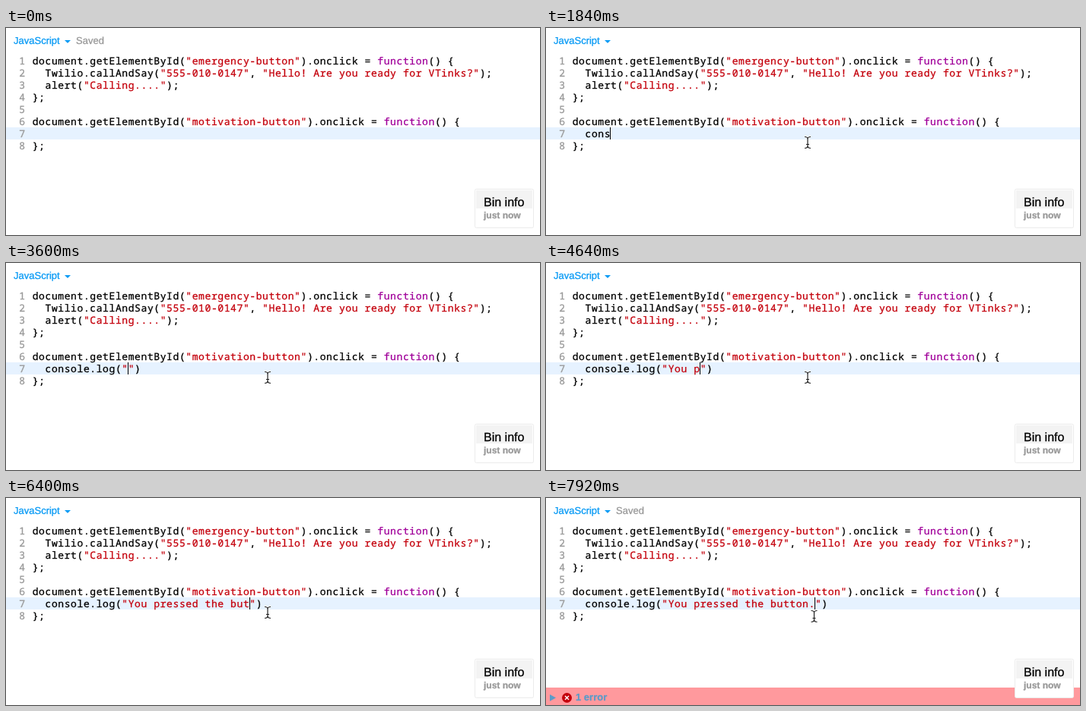
Write an HTML page with a canvas that moves like this. It is 702x273 px and loops after 8000 ms.

```html
<!DOCTYPE html>
<html lang="en">
<head>
<meta charset="utf-8">
<title>Code editor typing</title>
<style>
  html, body { margin: 0; width: 100%; height: 100%; overflow: hidden; background: #fff; }
  canvas { display: block; }
</style>
</head>
<body>
<canvas id="stage" width="702" height="273"></canvas>
<script>
const ctx = document.getElementById('stage').getContext('2d');
const W = 702, H = 273;
const LOOP = 8000, TICK = 80;
const CELL = 8.4, LINE = 16, CODE_X = 34.4, CODE_Y = 35;
const MONO = '13px "Noto Sans Mono", monospace';
const SANS = '"Liberation Sans", Arial, sans-serif';

const before = [
  'document.getElementById("emergency-button").onclick = function() {',
  '  Twilio.callAndSay("555-010-0147", "Hello! Are you ready for VTinks?");',
  '  alert("Calling....");',
  '};',
  '',
  'document.getElementById("motivation-button").onclick = function() {'
];
const after = ['};'];

// One tick per key press
const keys = 'console.log("You pressed the button.';
const pressed = [
  17, 19, 21, 23, 24, 26, 28, 32, 34, 36, 38, 42, 45,
  49, 51, 53, 55, 58, 60, 61, 64, 65, 67, 68, 70, 72, 73, 74, 76,
  78, 79, 80, 82, 83, 84, 99
];
const FADE_FROM = 2, FADE_TO = 11, CARET_OFF = 90, SAVED_AT = 94, MOUSE_MOVES = 99;

function rect(x, y, w, h, color) {
  ctx.fillStyle = color;
  ctx.fillRect(x, y, w, h);
}

// A hairline outline gives the slightly heavy look of smoothed screen text
function text(str, x, y, font, color) {
  ctx.font = font;
  ctx.fillStyle = ctx.strokeStyle = color;
  ctx.lineWidth = 0.3;
  ctx.fillText(str, x, y);
  ctx.strokeText(str, x, y);
}

function shape(points, color) {
  ctx.fillStyle = color;
  ctx.beginPath();
  points.forEach(([x, y]) => ctx.lineTo(x, y));
  ctx.fill();
}

function mono(str, x, row, color) {
  ctx.letterSpacing = '0.6px';
  text(str, x + 0.3, CODE_Y + row * LINE + 13, MONO, color);
  ctx.letterSpacing = '0px';
}

function tokenColor(token) {
  if (token[0] === '"') return '#c4000c';
  return token === 'function' ? '#a0009a' : '#000';
}

function codeLine(str, row) {
  mono(String(row + 1), CODE_X - 17.4, row, '#999');
  let col = 0;
  for (const token of str.split(/("[^"]*"|function)/)) {
    if (token.trim()) mono(token, CODE_X + col * CELL, row, tokenColor(token));
    col += token.length;
  }
}

function editor(tick) {
  const row = before.length;
  const typed = '  ' + keys.slice(0, pressed.filter(n => n <= tick).length);
  const closing = (typed.includes('"') ? '"' : '') + (typed.includes('(') ? ')' : '');
  rect(0, CODE_Y + row * LINE, W, LINE, '#e6f2ff');
  [...before, typed + closing, ...after].forEach(codeLine);
  if (tick >= FADE_TO && (tick < CARET_OFF || tick >= MOUSE_MOVES)) {
    rect(Math.floor(CODE_X + typed.length * CELL), CODE_Y + row * LINE, 1, LINE, '#000');
  }
}

function header(fade, saved) {
  text('JavaScript', 10, 21, '13px ' + SANS, '#0a9bf5');
  shape([[77, 16], [85, 16], [81, 20]], '#0a9bf5');
  ctx.globalAlpha = saved ? 1 : 1 - fade;
  text('Saved', 92, 21, '13px ' + SANS, '#999');
  ctx.globalAlpha = 1;
}

function errorBar() {
  rect(0, 250, W, 23, '#ff999d');
  shape([[5, 259], [13, 263.5], [5, 268]], '#5b9bc8');
  ctx.fillStyle = '#c4000c';
  ctx.beginPath();
  ctx.arc(27.5, 263.5, 6.5, 0, Math.PI * 2);
  ctx.fill();
  ctx.strokeStyle = '#fff';
  ctx.lineWidth = 1.4;
  ctx.beginPath();
  ctx.moveTo(25, 261); ctx.lineTo(30, 266);
  ctx.moveTo(30, 261); ctx.lineTo(25, 266);
  ctx.stroke();
  text('1 error', 39, 267, 'bold 13px ' + SANS, '#5b9bc8');
}

function infoBox() {
  ctx.fillStyle = '#fff';
  ctx.strokeStyle = '#ebebeb';
  ctx.lineWidth = 1;
  ctx.beginPath();
  ctx.roundRect(616.5, 212.5, 77, 51, 2);
  ctx.fill();
  ctx.stroke();
  rect(618, 214, 74, 24, '#f3f3f3');
  text('Bin info', 628, 235, '16px ' + SANS, '#000');
  text('just now', 628, 251, 'bold 12px ' + SANS, '#999');
}

function beam(x, y) {
  ctx.beginPath();
  ctx.moveTo(x - 4, y - 7);
  ctx.quadraticCurveTo(x, y - 7, x, y - 4);
  ctx.quadraticCurveTo(x, y - 7, x + 4, y - 7);
  ctx.moveTo(x, y - 4);
  ctx.lineTo(x, y + 5);
  ctx.moveTo(x - 4, y + 8);
  ctx.quadraticCurveTo(x, y + 8, x, y + 5);
  ctx.quadraticCurveTo(x, y + 8, x + 4, y + 8);
  ctx.moveTo(x - 2, y + 3);
  ctx.lineTo(x + 2, y + 3);
  for (const [width, color] of [[2.6, 'rgba(255,255,255,.75)'], [1.2, '#222']]) {
    ctx.lineWidth = width;
    ctx.strokeStyle = color;
    ctx.stroke();
  }
}

function mouse(tick, fade) {
  if (tick < FADE_FROM) return;
  if (tick >= MOUSE_MOVES) return beam(352.5, 155.5);
  const away = (1 - fade) ** 2;
  beam(344 + 30 * away, 150.5 + 130 * away);
}

function draw(now) {
  const tick = Math.floor((now % LOOP) / TICK);
  const fade = Math.min(1, Math.max(0, (tick - FADE_FROM + 1) / (FADE_TO - FADE_FROM)));
  const saved = tick >= SAVED_AT;
  ctx.textRendering = 'geometricPrecision';
  rect(0, 0, W, H, '#fff');
  header(fade, saved);
  editor(tick);
  if (saved) errorBar();
  infoBox();
  mouse(tick, fade);
}

function loop() {
  draw(performance.now());
  requestAnimationFrame(loop);
}
loop();
</script>
</body>
</html>
```
